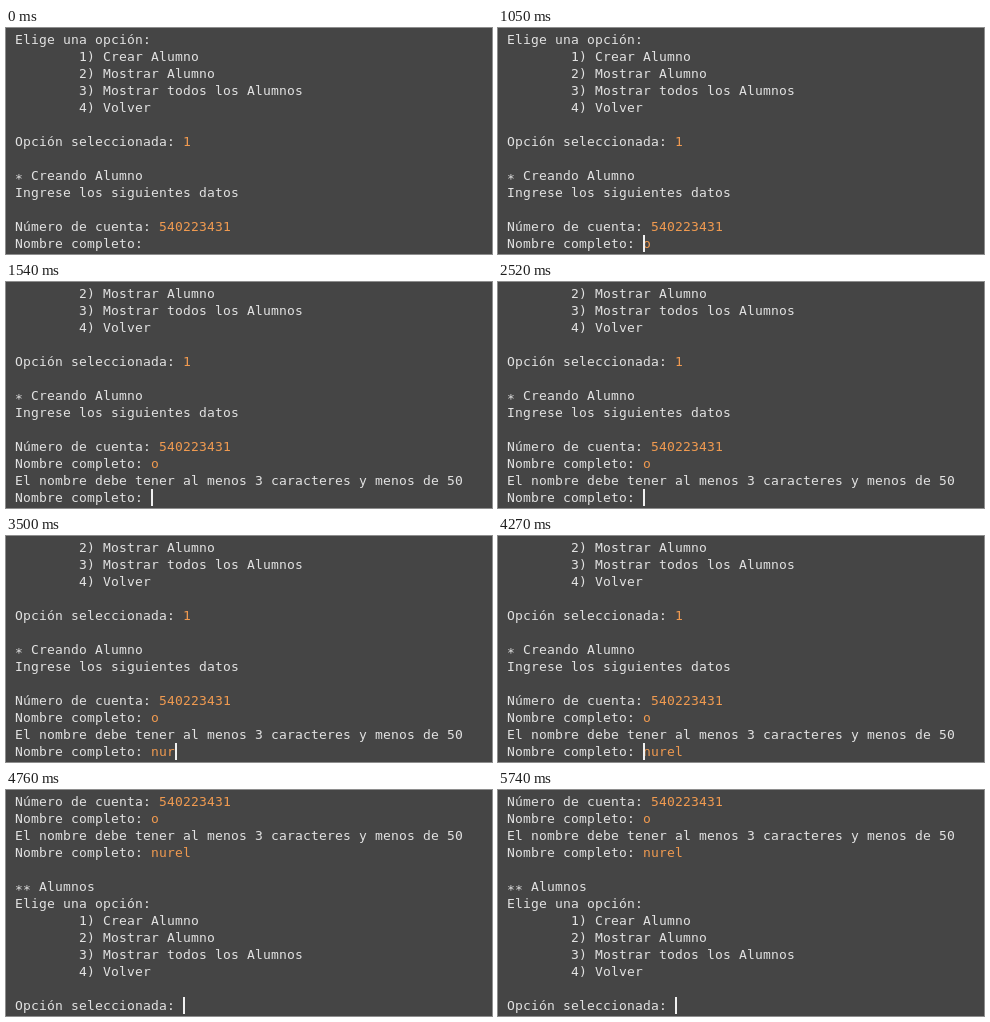
Write an HTML page that moves like this. It is 486x226 px and loops after 6230 ms.

```html
<!DOCTYPE html>
<html lang="es">
<head>
<meta charset="utf-8">
<title>Consola</title>
<style>
  html, body { margin: 0; width: 100%; height: 100%; overflow: hidden; background: #454545; }
  #screen {
    position: absolute; left: 0; top: 0; width: 486px; height: 226px; overflow: hidden;
    background: #454545; color: #e2e2e2;
    font: 13px/17px "DejaVu Sans Mono", monospace;
    letter-spacing: calc(8px - 1ch);
    font-variant-ligatures: none;
  }
  .row { position: absolute; left: 9px; height: 17px; white-space: pre; }
  .input { color: #f09a50; }
  .star { position: relative; top: 3px; }
  #caret { position: absolute; width: 2px; height: 17px; top: 207px; background: #f0f0f0; }
</style>
</head>
<body>
<div id="screen"></div>
<script>
const LOOP = 6230, CELL = 8, LINE = 17, LEFT = 9, TOP = 3, ROWS = 13;
const NAME = "nurel";
const ASK = "Nombre completo: ", PICK = "Opción seleccionada: ";
const MENU = [
  "Elige una opción:",
  ...["Crear Alumno", "Mostrar Alumno", "Mostrar todos los Alumnos", "Volver"]
    .map((label, i) => `        ${i + 1}) ${label}`),
  ""
];

// Each log line is [printed text, typed text].
const log = [
  ...MENU.map(text => [text]),
  [PICK, "1"],
  [""],
  ["* Creando Alumno"],
  ["Ingrese los siguientes datos"],
  [""],
  ["Número de cuenta: ", "540223431"],
  [ASK, "o"],
  ["El nombre debe tener al menos 3 caracteres y menos de 50"],
  [ASK, NAME],
  [""],
  ["** Alumnos"],
  ...MENU.map(text => [text])
];

// [start ms, first visible line, prompt, typed text, caret column or -1]
const steps = [
  [0, 0, ASK, "", -1],
  [490, 0, ASK, "o", 18],
  [1050, 0, ASK, "o", 17],
  [1260, 2, "", "", 0],
  [1540, 2, ASK, "", 17],
  [2030, 2, ASK, "", -1],
  [2520, 2, ASK, "", 17],
  ...[2800, 3010, 3500, 3570, 3780].map((t, i) => [t, 2, ASK, NAME.slice(0, i + 1), 18 + i]),
  [4270, 2, ASK, NAME, 17],
  [4480, 11, "", "", 0],
  [4760, 11, PICK, "", 21],
  [5250, 11, PICK, "", -1],
  [5740, 11, PICK, "", 21]
];

const screen = document.getElementById("screen");
const add = (tag, props) => screen.appendChild(Object.assign(document.createElement(tag), props));
const rows = Array.from({ length: ROWS }, (_, i) => {
  const row = add("div", { className: "row" });
  row.style.top = TOP + i * LINE + "px";
  return row;
});
const caret = add("div", { id: "caret" });

const markup = ([text, typed = ""]) =>
  text.replace(/\*/g, '<span class="star">*</span>') + `<span class="input">${typed}</span>`;

function show([, first, prompt, typed, column]) {
  const lines = [...log.slice(first, first + ROWS - 1), [prompt, typed]];
  rows.forEach((row, i) => { row.innerHTML = markup(lines[i]); });
  caret.style.display = column < 0 ? "none" : "block";
  caret.style.left = LEFT + column * CELL + "px";
}

let current;
const start = performance.now();
function tick() {
  const t = (performance.now() - start) % LOOP;
  const step = steps.filter(s => s[0] <= t).pop();
  if (step !== current) show(current = step);
  requestAnimationFrame(tick);
}
tick();
</script>
</body>
</html>
```
